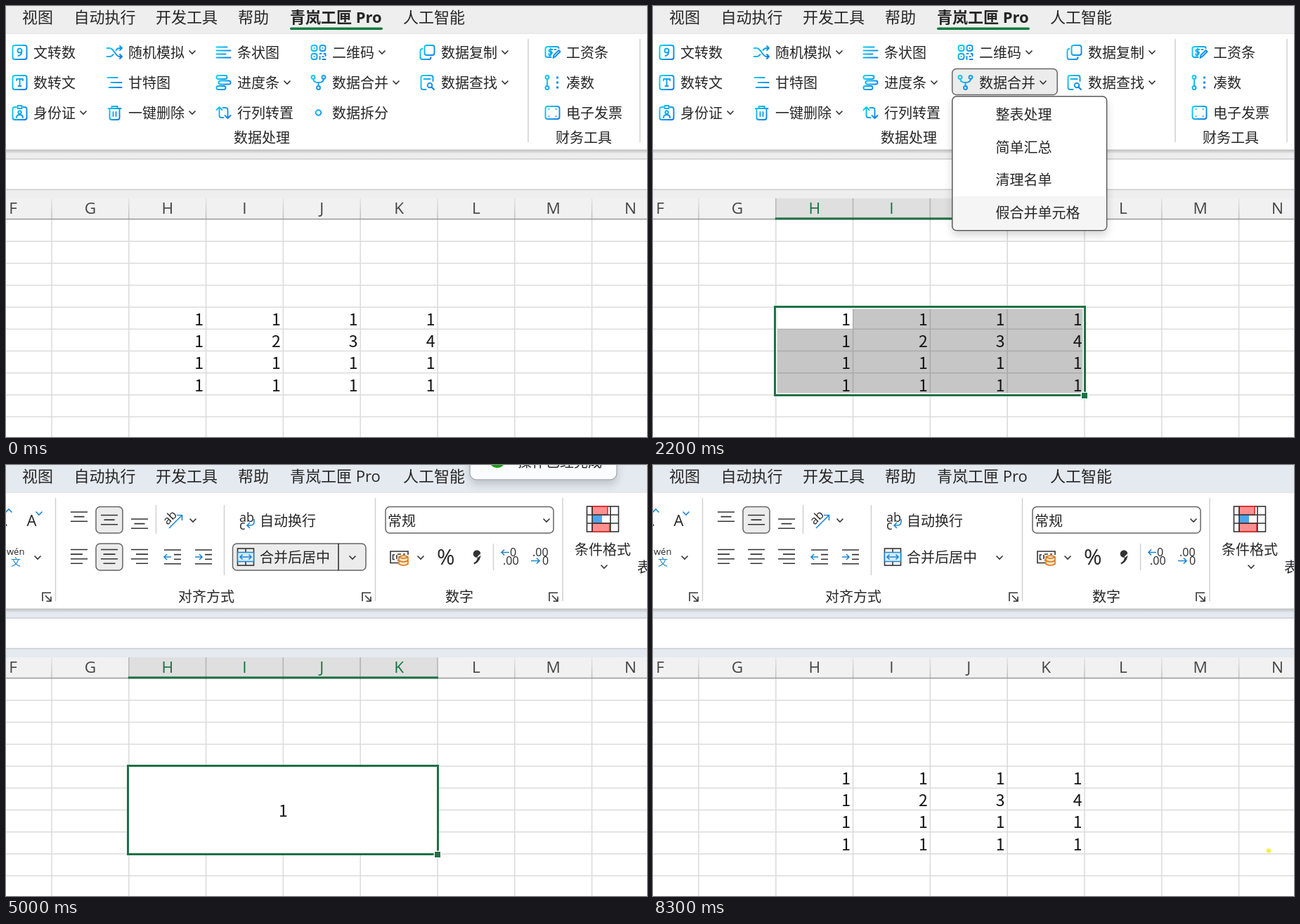
An HTML page that plays this animation: 912 by 614 pixels, repeating every 8.4 s.

```html
<!DOCTYPE html>
<html lang="zh">
<head>
<meta charset="utf-8">
<title>合并单元格演示</title>
<style>
html, body { margin: 0; width: 100%; height: 100%; overflow: hidden; background: #fff; }
#stage { position: relative; width: 912px; height: 614px; overflow: hidden; }
svg { position: absolute; left: 0; top: 0; width: 912px; height: 614px; }
text { font: 20px "Open Sans", "Noto Sans CJK SC", "Noto Sans CJK", sans-serif; fill: #262626; }
.tab { font-size: 22px; }
.bold { font-weight: 700; }
.letter { font-size: 22.5px; text-anchor: middle; fill: #444; }
.on .letter { fill: #1a6f43; }
.digit { font: 23px "Noto Sans CJK SC", "Noto Sans CJK", sans-serif; text-anchor: end; fill: #111; }
.mid { text-anchor: middle; }
.line { fill: none; stroke: #333; stroke-width: 1.6; }
.blue { stroke: #1e86cf; }
.icon { fill: none; stroke: url(#sky); stroke-width: 1.9; stroke-linecap: round; stroke-linejoin: round; }
.rule { stroke: #d0d0d0; stroke-width: 1.5; }
.pressed { fill: #ececec; stroke: #666; stroke-width: 1.5; }

/* times in a loop of 8400 ms, as percentages */
.t, .bar, #sel { animation: 8.4s step-end infinite; }
.t { opacity: 0; }
.bar { fill: #eeeeef; animation-name: tint; }
@keyframes tint { 0% { fill: #eeeeef } 3.57% { fill: #eaecef } 4.76% { fill: #e4eaf0 } 23.8% { fill: #eeeeef } 32.14% { fill: #e4eaf0 } }

#sel {
  position: absolute; box-sizing: border-box; border: 3.4px solid #1e7145;
  box-shadow: inset 0 0 0 1.5px #fff; opacity: 0; animation-name: select;
}
#sel::after {
  content: ""; position: absolute; right: -5.5px; bottom: -5.5px; width: 8px; height: 8px;
  background: #1e7145; box-shadow: 0 0 0 1.3px #fff;
}
@keyframes select {
  0% { opacity: 0; background: #0000; left: 725px; top: 427px; width: 113.6px; height: 35px }
  8.33% { opacity: 1; background: #0000; left: 725px; top: 427px; width: 113.6px; height: 35px }
  9.52% { opacity: 1; background: #0000; left: 172.4px; top: 427px; width: 113.6px; height: 35px }
  10.71% { opacity: 1; background: #00000039; left: 172.4px; top: 427px; width: 223.5px; height: 66.3px }
  11.9% { opacity: 1; background: #00000039; left: 172.4px; top: 427px; width: 333.4px; height: 97.6px }
  13.09% { opacity: 1; background: #00000039; left: 172.4px; top: 427px; width: 443.6px; height: 129px }
  32.14% { opacity: 1; background: #fff; left: 172.4px; top: 427px; width: 443.6px; height: 129px }
  75% { opacity: 1; background: #00000039; left: 172.4px; top: 427px; width: 443.6px; height: 129px }
  88.09% { opacity: 1; background: #0000; left: 515px; top: 450.5px; width: 189px; height: 57px }
  89.28% { opacity: 1; background: #0000; left: 612.2px; top: 458.6px; width: 113.6px; height: 35px }
  98.8% { opacity: 0; background: #0000; left: 612.2px; top: 458.6px; width: 113.6px; height: 35px }
}

#colH { animation-name: colH } #colI { animation-name: colI } #colJ { animation-name: colJ }
#colK { animation-name: colK } #colL { animation-name: colL } #overK { animation-name: overK }
@keyframes colH { 0% { opacity: 0 } 8.33% { opacity: 1 } 88.09% { opacity: 0 } }
@keyframes colI { 0% { opacity: 0 } 10.71% { opacity: 1 } 88.09% { opacity: 0 } }
@keyframes colJ { 0% { opacity: 0 } 11.9% { opacity: 1 } 88.09% { opacity: 0 } }
@keyframes colK { 0% { opacity: 0 } 13.09% { opacity: 1 } 88.09% { opacity: 0 } }
@keyframes colL { 0% { opacity: 0 } 88.09% { opacity: 1 } 98.8% { opacity: 0 } }
@keyframes overK { 0% { opacity: 0 } 52.38% { opacity: 1 } 53.57% { opacity: 0 } }

#active { animation-name: active } #digits { animation-name: digits } #merged { animation-name: merged }
#quick { animation-name: quick } #dot { animation-name: dot }
@keyframes active { 0% { opacity: 0 } 10.71% { opacity: 1 } 32.14% { opacity: 0 } 75% { opacity: 1 } 88.09% { opacity: 0 } }
@keyframes digits { 0% { opacity: 1 } 32.14% { opacity: 0 } 75% { opacity: 1 } }
@keyframes merged { 0% { opacity: 0 } 32.14% { opacity: 1 } 75% { opacity: 0 } }
@keyframes quick { 0% { opacity: 0 } 15.47% { opacity: 1 } 17.85% { opacity: 0 } 33.33% { opacity: 1 } 53.57% { opacity: 0 } }
@keyframes dot { 0% { opacity: 0 } 98.8% { opacity: 1 } }

#tools, #tabOn { animation-name: tools } #home, #tabOff { animation-name: home }
#overFind { animation-name: overFind } #overJoin { animation-name: overJoin }
#menu, #joinDown { animation-name: menu } #pick { animation-name: pick }
#toast { animation-name: toast } #center { animation-name: center }
#joined { animation-name: joined } #overMerge { animation-name: overMerge }
@keyframes tools { 0% { opacity: 1 } 59.52% { opacity: 0 } }
@keyframes home { 0% { opacity: 0 } 59.52% { opacity: 1 } }
@keyframes overFind { 0% { opacity: 0 } 20.23% { opacity: 1 } 22.61% { opacity: 0 } }
@keyframes overJoin { 0% { opacity: 0 } 22.61% { opacity: 1 } 23.8% { opacity: 0 } }
@keyframes menu { 0% { opacity: 0 } 23.8% { opacity: 1 } 30.95% { opacity: 0 } }
@keyframes pick { 0% { opacity: 0 } 26.19% { opacity: 1 } 30.95% { opacity: 0 } }
@keyframes toast { 0% { opacity: 0 } 54.76% { opacity: .5 } 55.95% { opacity: 1 } 86.9% { opacity: 0 } }
@keyframes center { 0% { opacity: 1 } 75% { opacity: 0 } }
@keyframes joined { 0% { opacity: 1 } 75% { opacity: 0 } }
@keyframes overMerge { 0% { opacity: 0 } 69.04% { opacity: 1 } 86.9% { opacity: 0 } }
</style>
</head>
<body>
<div id="stage">
  <svg id="sheet"></svg>
  <div id="sel"></div>
  <svg id="front"></svg>
</div>
<script>
const colX = i => 65 + 109.8 * i;
const rowY = i => 304 + 31.25 * i;
const range = n => [...Array(n).keys()];
const each = (list, fn) => list.map(fn).join('');

const text = (x, y, s, cls = '', more = '') => `<text x="${x}" y="${y + 7.6}" class="${cls}" ${more}>${s}</text>`;
const rect = (x, y, w, h, more = '') => `<rect x="${x}" y="${y}" width="${w}" height="${h}" ${more}/>`;
const path = (d, cls = 'line', more = '') => `<path d="${d}" class="${cls}" ${more}/>`;
const group = (id, body, cls = 't') => `<g id="${id}" class="${cls}">${body}</g>`;
const chevron = (x, y, cls = 'line') => path(`M${x - 4.5} ${y - 2.5}l4.5 4.5 4.5 -4.5`, cls);
const rule = (x, y1 = 47, y2 = 194) => path(`M${x} ${y1}V${y2}`, 'rule');
const circle = (x, y, r) => `M${x - r} ${y}a${r} ${r} 0 1 0 ${2 * r} 0a${r} ${r} 0 1 0 ${-2 * r} 0`;
const box = (x, y, w, h, r = 3) =>
  `M${x + r} ${y}h${w - 2 * r}q${r} 0 ${r} ${r}v${h - 2 * r}q0 ${r} ${-r} ${r}h${2 * r - w}q${-r} 0 ${-r} ${-r}v${2 * r - h}q0 ${-r} ${r} ${-r}`;

// sheet: bars, headers, grid
const letter = i => text(colX(i) - 54.9, 288.6, 'FGHIJKLMN'[i], 'letter');
const heading = (i, fill) => rect(colX(i - 1), 274, 109.8, 28, `fill="${fill}"`) +
  path(`M${colX(i - 1)} 274V303M${colX(i)} 274V303`, '', 'stroke="#b4b4b4" stroke-width="1.4"') +
  rect(colX(i - 1) - 1, 301.4, 111.8, 3, 'fill="#1e7145"') + letter(i);

sheet.innerHTML = `<defs>
  <linearGradient id="shade" x2="0" y2="1"><stop stop-color="#bcbcbe"/><stop offset="1" stop-color="#bcbcbe" stop-opacity="0"/></linearGradient>
  <linearGradient id="sep" x1="0" x2="0" y1="274" y2="304" gradientUnits="userSpaceOnUse"><stop stop-color="#e4e4e4"/><stop offset="1" stop-color="#b8b8b8"/></linearGradient>
  </defs>` +
  rect(0, 0, 912, 39, 'class="bar"') + path('M0 39.2H912', '', 'stroke="#dfe0e2"') +
  rect(0, 205, 912, 13, 'class="bar"') + rect(0, 204.5, 912, 6, 'fill="url(#shade)"') +
  rect(0, 262, 912, 12, 'class="bar"') +
  path('M0 218H912M0 261.5H912', '', 'stroke="#cbcccf" stroke-width="1.5"') +
  rect(0, 274, 912, 30, 'fill="#f1f1f1"') +
  each(range(8), i => rect(colX(i) - .7, 274, 1.4, 30, 'fill="url(#sep)"')) +
  path(each(range(8), i => `M${colX(i)} 304V614`) + each(range(9), i => `M0 ${rowY(i + 1)}H912`), '', 'stroke="#dcdcdc" stroke-width="1.6" fill="none"') +
  path('M0 303.6H912', '', 'stroke="#a3a3a3" stroke-width="1.6"') +
  each(range(9), letter) +
  each([2, 3, 4, 5, 6], i => group('col' + 'FGHIJKLMN'[i], heading(i, '#dfdfdf'), 't on')) +
  group('overK', heading(5, '#9fd5b7'), 't on');

// ribbon icons on a 22 px square
const frame = box(1, 1, 20, 20);
const icons = {
  nine: frame + 'M14 8.5a3 3 0 1 1-6 0a3 3 0 1 1 6 0c0 5-1.5 7-5 7.5',
  type: frame + 'M6.5 8V6H15.5V8M11 6V16M9 16H13',
  badge: 'M6 3H4Q1 3 1 6V18Q1 21 4 21H18Q21 21 21 18V6Q21 3 18 3H16M8 1H14V5H8Z' + circle(11, 10.5, 2.2) + 'M6.5 18Q6.5 14 11 14T15.5 18',
  shuffle: 'M0 5H4Q7 5 11 11T18 17H21M0 17H4Q7 17 9 14M13 8Q15 5 18 5H21M18.5 2l3 3-3 3M18.5 14l3 3-3 3',
  gantt: 'M1 4H15M6 11H21M3 18H21',
  trash: 'M2 5H20M7 5V2H15V5M4 5V18Q4 21 7 21H15Q18 21 18 18V5M9 10V16M13 10V16',
  bars: 'M1 3.5H16M1 8.5H21M1 13.5H14M1 18.5H21',
  pills: box(1, 1, 15, 5, 2.5) + box(4, 8.5, 17, 5, 2.5) + box(1, 16, 13, 5, 2.5),
  turn: 'M5 3V15Q5 18 8 18H11M1 7l4-4 4 4M10 4H14Q17 4 17 7V19M13 15l4 4 4-4',
  code: box(1, 1, 8, 8) + box(13, 1, 8, 8) + box(1, 13, 8, 8) + 'M5 5h.1M17 5h.1M5 17h.1M13 13h2M19 13h2v3M13 17v4M17 17h1M17 21h4',
  join: circle(3.5, 3.5, 2.5) + circle(18.5, 3.5, 2.5) + circle(11, 18.5, 2.5) + 'M3.5 6Q4 11 11 11Q18 11 18.5 6M11 11V16',
  split: circle(11, 11, 3.8),
  copy: box(7, 1, 14, 14) + 'M4 6Q1 6 1 9V18Q1 21 4 21H13Q16 21 16 18',
  find: 'M9 21H5Q2 21 2 18V4Q2 1 5 1H16Q19 1 19 4V9M6 6H15' + circle(14.5, 15, 3.3) + 'M17 17.5l3.5 3.5',
  pay: 'M20 5Q20 3 17 3H4Q1 3 1 6V15Q1 18 4 18H9M11 7Q6 6 6 8.5T9 10.5T9 14T6 13M8.5 5.5V15.5M12 19l1-4 7-7 2 2-7 7ZM14 7H16',
  sum: circle(3.5, 3.5, 2.5) + 'M3.5 6V16' + circle(3.5, 18.5, 2.5) + circle(18, 4, .8) + circle(18, 11, .8) + circle(18, 18, .8),
  bill: box(1, 2, 20, 18) + 'M6 6h.1M16 6h.1M6 16h.1M16 16h.1'
};
const columns = [
  [20, ['nine', '文转数'], ['type', '数转文'], ['badge', '身份证', 1]],
  [155, ['shuffle', '随机模拟', 1], ['gantt', '甘特图'], ['trash', '一键删除', 1]],
  [310, ['bars', '条状图'], ['pills', '进度条', 1], ['turn', '行列转置']],
  [445, ['code', '二维码', 1], ['join', '数据合并', 1], ['split', '数据拆分']],
  [600, ['copy', '数据复制', 1], ['find', '数据查找', 1]],
  [778, ['pay', '工资条'], ['sum', '凑数'], ['bill', '电子发票']]
];
const command = (x, y, [icon, name, more]) =>
  path(icons[icon], 'icon', `transform="translate(${x - 11.5} ${y - 11})"`) + text(x + 19, y, name) +
  (more ? chevron(x + 30 + 20 * name.length, y) : '');
const tools = group('overFind', rect(580, 89, 150, 38, 'rx="5" fill="#f3f3f3"')) +
  group('overJoin', rect(426, 89, 150, 38, 'rx="5" fill="#f3f3f3"')) +
  group('joinDown', rect(425.7, 89.5, 149.5, 37, 'rx="6" class="pressed"')) +
  each(columns, ([x, ...items]) => each(items, (item, i) => command(x, 66 + 43 * i, item))) +
  text(364, 187, '数据处理', 'mid') + text(822, 187, '财务工具', 'mid') + rule(743) + rule(902);

// home ribbon
const rows = (x, y, widths, align, gap = 6.6) => path(each(widths, (w, i) =>
  `M${x + (24 - w) * align} ${y + gap * i}h${w}`));
const launcher = x => path(`M${x - 6} 194V182H${x + 6}M${x - 2} 186l7 7M${x + 6} 187.5V194H${x - .5}`);
const small = (x, y, s, size, more = '') => `<text x="${x}" y="${y}" style="font-size:${size}px" ${more}>${s}</text>`;
const indent = (x, dir) => rows(x - 12, 121, [24, 0, 0, 24], 0) + path(`M${x + 2} 127.6h10M${x + 2} 134.2h10`) +
  path(`M${x - 12} 131h10M${dir < 0 ? `${x - 8} 127l-4 4 4 4` : `${x - 6} 127l4 4-4 4`}`.replace(/10M/, '10M'), 'line blue');
const home =
  small(-13, 87, 'A', 23) + chevron(4, 70, 'line blue').replace('l4.5 4.5 4.5 -4.5', 'l4.5 -4.5 4.5 4.5') +
  small(29.5, 87, 'A', 22) + chevron(47, 69, 'line blue') +
  small(1, 128, 'wén', 13) + small(7, 143, '文', 14, 'style="fill:#1e86cf"').replace('<text', '<text fill="#1e86cf"').replace('14px"', '14px;fill:#1e86cf"') +
  chevron(45, 132) + launcher(58) + rule(70.5) +
  rect(128, 59.5, 38, 37.5, 'rx="6" class="pressed"') +
  group('center', rect(128, 112, 38, 38, 'rx="6" class="pressed"')) +
  rows(92, 67, [24, 15, 24], .5) + rows(135, 71.5, [24, 15, 24], .5) + rows(178, 77, [24, 15, 24], .5) +
  rows(92, 120.5, [24, 17, 24, 17], 0) + rows(135, 120.5, [24, 17, 24, 17], .5) + rows(178, 120.5, [24, 17, 24, 17], 1) +
  rule(213.5, 57, 98) + rule(310.5, 57, 157) +
  small(0, 0, 'ab', 17, 'transform="translate(230 86) rotate(-45)"') + path('M232 90L250 72M243 71.5H250.5V79', 'line blue') + chevron(266, 79) +
  indent(237, -1) + indent(281, 1) +
  small(332, 81, 'ab', 18) + small(332, 92, 'c', 18) + path('M353 77v4q0 5-6 5h-4M347 82l-4 4 4 4', 'line blue') + text(361, 79, '自动换行') +
  group('joined', rect(322.5, 112, 189.5, 38, 'rx="6" class="pressed"') + path('M473 112V150')) +
  group('overMerge', rect(323.5, 113, 148.5, 36, 'rx="5" fill="#f2f2f2"')) +
  rect(329.5, 119, 23, 24, 'fill="#fff" class="line"') + path('M341 119v6M341 137v6') +
  rect(329.5, 124.5, 23, 13, 'fill="#d7ebfa" stroke="#1e86cf" stroke-width="1.5"') +
  path('M333 131h16M336.500 127.500l-3.500 3.500 3.500 3.500M345.500 127.500l3.500 3.500-3.500 3.500', 'line blue') +
  text(361, 131, '合并后居中') + chevron(493, 132) +
  text(285, 187, '对齐方式', 'mid') + launcher(513) + rule(525.5) +
  rect(540, 59.5, 239, 37.5, 'rx="6" fill="#fff" stroke="#666" stroke-width="1.5"') + text(543, 79, '常规') + chevron(769, 79) +
  path('M558 139.500H547V123H572V128M553 128h-2.500v6.500H553M557 127h5M557 135.500h1M556 128v6M565 127h3') +
  path('M559 131v10q6.500 4 13 0v-10q-6.500-4-13 0q6.500 4 13 0M559 136q6.500 4 13 0', '', 'fill="#fde3c4" stroke="#d9730d" stroke-width="1.5"') +
  chevron(590, 132) + small(613, 142, '%', 31) +
  path(circle(670, 126.5, 5.3) + 'M675.300 126q1 11-9 15.500l-1-2q6-3 5.500-9z', '', 'fill="#333"') + rule(693.5, 112, 150) +
  small(717, 130, '0', 16) + small(707, 142, '.00', 16) + path('M716 124.500H705M709 120.500l-4 4 4 4', 'line blue') +
  small(749, 130, '.00', 16) + small(763, 142, '0', 16) + path('M747 136.500H759M755 132.500l4 4-4 4', 'line blue') +
  text(645, 187, '数字', 'mid') + launcher(779) + rule(792) +
  rect(826.5, 59, 45, 36, 'fill="#fff" class="line"') +
  rect(834, 59, 22, 12, 'fill="#ff8f8f" stroke="#e02020" stroke-width="1.5"') +
  rect(834, 71, 14, 12, 'fill="#4da6e8"') + rect(834, 83, 25, 12, 'fill="#ff8f8f" stroke="#e02020" stroke-width="1.5"') +
  path('M826.500 71H871.500M826.500 83H871.500M834 59V95M860 59V95', 'line', 'stroke-width="1.2"') +
  text(849, 120, '条件格式', 'mid') + chevron(851, 145) + text(898, 145, '表');

const tabs = [[23, '视图'], [96.5, '自动执行'], [213, '开发工具'], [330, '帮助'], [565, '人工智能']];
const brand = '青岚工匣 Pro';
const tab = (x, s, cls = '') => text(x, 16.6, s, 'tab ' + cls);
const values = [[1, 1, 1, 1], [1, 2, 3, 4], [1, 1, 1, 1], [1, 1, 1, 1]];

front.innerHTML = `<defs>
  <linearGradient id="sky" gradientUnits="userSpaceOnUse" x1="0" y1="4" x2="22" y2="18"><stop stop-color="#10d0ee"/><stop offset="1" stop-color="#0d78e8"/></linearGradient>
  <filter id="soft" x="-20%" y="-20%" width="140%" height="150%"><feDropShadow dx="0" dy="6" stdDeviation="6" flood-opacity=".16"/></filter>
  </defs>` +
  group('active', rect(177, 431.5, 107, 28.2, 'fill="#fff"')) +
  group('digits', each(values, (row, r) => each(row, (v, c) =>
    text(colX(c + 2) - 3.6, rowY(r + 4) + 18.2, v, 'digit')))) +
  group('merged', text(400.8, 493.8, '1', 'digit')) +
  group('quick', rect(620.2, 560.5, 35, 34.5, 'fill="#fff" stroke="#5b9a78" stroke-width="1.6"') +
    path('M635 567.500H649V589H625V582M630 584H644V576H636V580H630Z', 'line', 'style="stroke:#777"') +
    path('M627 565H634L631 571H636L624 581L627 574H623Z', '', 'fill="#f3a35c" stroke="#d9752a"')) +
  group('dot', '<circle cx="876" cy="549.5" r="3.3" fill="#f3f04a"/>') +
  each(tabs, ([x, s]) => tab(x, s)) +
  group('tabOn', tab(404, brand, 'bold') + rect(404, 30.6, 132, 3.4, 'rx="1.7" fill="#107c41"')) +
  group('tabOff', tab(404, brand)) +
  group('tools', tools) + group('home', home) +
  group('menu', rect(425.8, 128.7, 219.8, 191, 'rx="6" fill="#fff" stroke="#5a5a5a" stroke-width="1.5" filter="url(#soft)"') +
    group('pick', rect(427, 271, 217.5, 47, 'rx="4" fill="#f5f5f5"')) +
    each(['整表处理', '简单汇总', '清理名单', '假合并单元格'], (s, i) => text(487.5, 154.3 + 46.7 * i, s))) +
  group('toast', rect(660, -50, 209, 71, 'rx="9" fill="#fbfcfd" stroke="#a9adb1" stroke-width="1.4" filter="url(#soft)"') +
    '<circle cx="699" cy="-8" r="12" fill="#13a10e"/>' + text(728, -5, '操作已经完成'));
</script>
</body>
</html>
```
